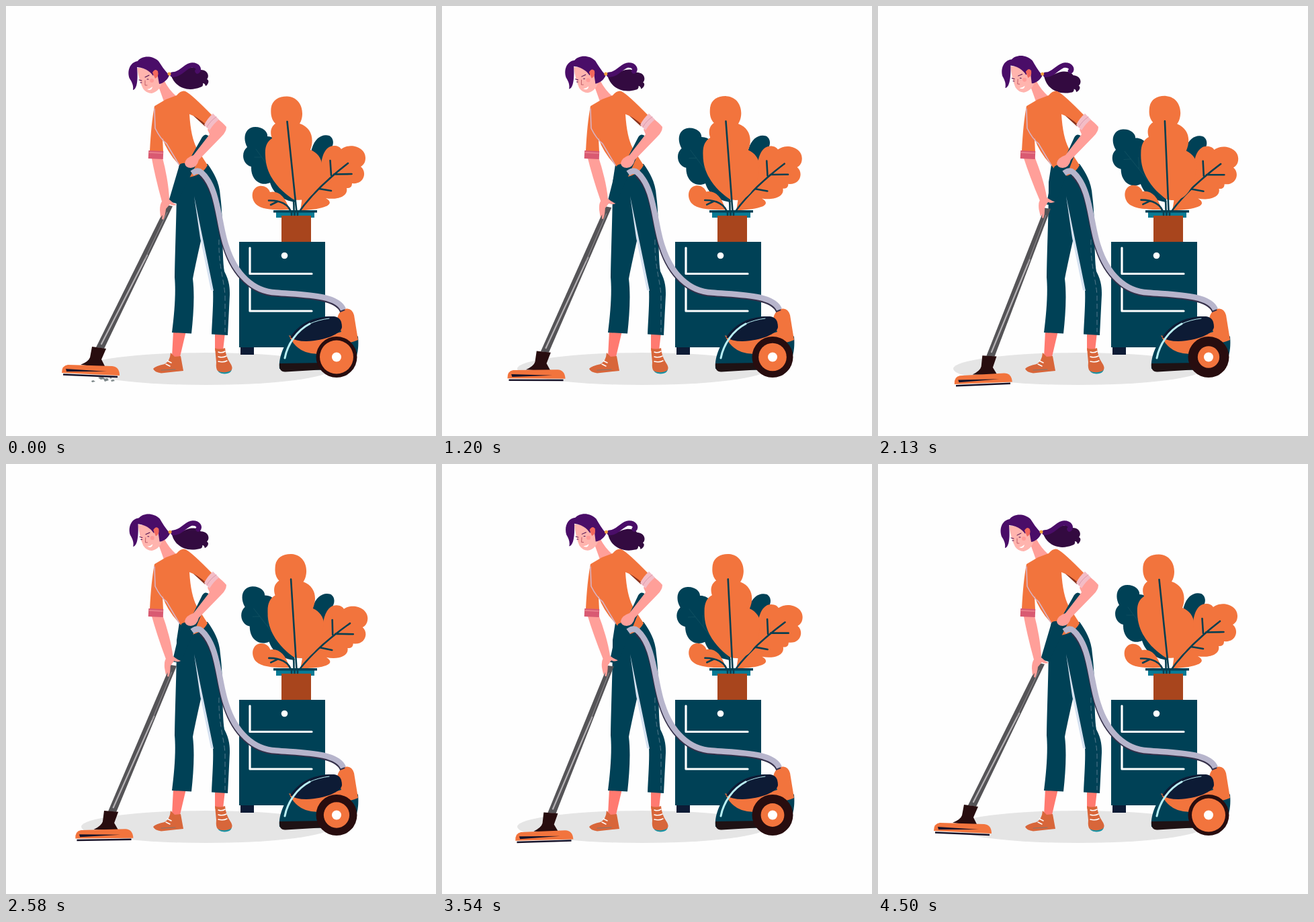
Write an HTML page that moves like this. It is 640 px wide and 640 px high and loops after 4530 ms.

```html
<!DOCTYPE html>
<html lang="en">
<head>
<meta charset="utf-8">
<title>Vacuuming</title>
<style>
  html, body { margin: 0; height: 100%; overflow: hidden; background: #fefefe; }
  svg { display: block; width: 100vw; height: 100vh; }
  .orange { fill: #f2743d; } .teal { fill: #004156; } .skin { fill: #ff9f99; }
  .navy { fill: #0d1b35; } .shoe { fill: #d8663a; } .ankle { fill: #ff7a70; }
  .line { fill: none; stroke-linecap: round; stroke-linejoin: round; }
  .flat { fill: none; }
  .vein { stroke: #073f50; stroke-width: 2.6; }
  .white { stroke: #fff; }
</style>
</head>
<body>
<svg viewBox="0 0 640 640">
  <ellipse cx="298" cy="540" rx="186" ry="24" fill="#e5e5e5"/>

  <!-- cabinet -->
  <path class="navy" d="M349 507h20v12h-20z"/>
  <path class="teal" d="M347 351h128v157h-128z"/>
  <path class="line white" stroke-width="3.2" d="M363 360v38.500h92M363 418v36h92"/>
  <circle cx="414.500" cy="371.500" r="4.800" fill="#fff"/>

  <!-- plant -->
  <g id="backLeaf">
    <path class="teal" d="M430 292C412 289 398 280 393 263C380 269 364 260 365 239C352 236 349 218 359 210C351 195 357 180 371 180C383 180 390 188 389 194C402 194 410 206 407 220L428 262Z"/>
    <path class="line" stroke="#0d4d5f" d="M372 213L428 291M392 241v-18M381 225h-11"/>
  </g>
  <g id="sideLeaf">
    <path class="teal" d="M455 213C460 195 472 190 481 193C489 197 488 208 483 213C488 220 481 235 467 239L440 290Z"/>
  </g>
  <g id="lowLeaf">
    <path class="orange" d="M424 303C405 304 381 304 372 295C363 285 366 270 377 268C386 267 391 272 393 277C405 274 416 284 421 301Z"/>
    <path class="line vein" d="M425 311C423 294 406 289 391 289.500M404 291L394 296"/>
  </g>
  <g id="rightLeaf">
    <path class="orange" d="M438 305L441 284L469 237C470 222 476 208 488 208C494 208 497 210 499 213C512 203 535 210 535 226C535 233 532 237 528 239C538 247 533 266 515 264C515 271 510 271 507 271C510 284 491 289 476 286C485 291 483 296 474 299C464 303 449 303 438 305Z"/>
    <path class="line vein" d="M433 311C447 290 469 265 509 234M484 252L482.500 230M488 250.500L514.500 250M466 272L484 275"/>
  </g>
  <g id="midLeaf">
    <path class="orange" d="M428 288C414 279 387 258 386 223C385 210 388 202 396 197C392 187 395 179 401 175C394 168 394 159 394.500 152C396 140 406 134.500 418 134.500C434 135 441 148 441 160C441 167 439 172 437 175C455 181 459 198 453 214C466 219 473 232 469 243C470 260 464 268 460 275C453 286 442 291 428 288Z"/>
    <path class="line vein" d="M418.500 172L433 311"/>
  </g>
  <path class="line vein" d="M428 290C429 300 428 304 429 311"/>
  <path d="M402 306h57v9h-57z" fill="#087b95"/>
  <path d="M410 312h44v39h-44z" fill="#a8451d"/>
  <path class="teal" d="M398 304h65v3.500h-65z"/>
  <path class="line vein" stroke-width="2" d="M425 305v6M429.500 305v6M434 305v6"/>

  <!-- vacuum cleaner -->
  <path class="teal" d="M407 540C405 520 417 499 426 488C440 468 465 461 488 462L524 492Q526 515 518 532L480 542Z"/>
  <path class="orange" d="M421 490Q445 503 499 485L493 466Q495 452 507 450.500Q515 450 518 460L524 497Q510 503 505 500L472 517Q435 522 421 490Z"/>
  <path class="navy" d="M423 493C438 469 465 461 488 462Q500 463 500 478C499 488 475 498 447 499Q431 499 423 493Z"/>
  <path class="line" stroke="#b9eff4" stroke-width="3" d="M415 524C419 503 433 483 452 473"/>
  <path class="line" stroke="#b9eff4" stroke-width="1" d="M452 473Q465 467 481 465"/>
  <path d="M407 532L475 531V541L416 544.500Q406 545 407 532Z" fill="#1e1214"/>
  <circle cx="492" cy="522.500" r="30.500" fill="#280d0f"/>
  <circle id="tyre" class="orange" cx="492" cy="522.500" r="25"/>
  <circle cx="492" cy="522.500" r="7" fill="#fff"/>

  <!-- legs -->
  <path class="ankle" d="M249 484h19L259 522H247ZM311 486h15L323 513H311Z"/>
  <path class="shoe" d="M245 516L251 522L260 521L264 543L231 546.500Q221 545 219 540Q222 536 236 533Q244 529 245 516Z"/>
  <path d="M314 538H336Q337 547 325 547.500Q314 547 314 538Z" fill="#1593a5"/>
  <path class="shoe" d="M311 509Q318 512 326 509Q327 522 334 532Q340 541 332 544Q322 547 315 543Q312 540 313 530Z"/>
  <path class="line white" stroke-width="1.500" d="M238 533L244 536M240 528L246 531M316 515Q321 517 326 514M316 522Q322 524 328 521M316 529Q323 531 329 528"/>
  <path class="line" stroke="#80766f" d="M231 542L252 541"/>
  <path class="teal" d="M258 236L300 235C311 250 318 265 319 283C324 320 321 370 325 395C333 410 333 421 333 430L330 490L306 488.500C307 465 309 440 308 422C301 395 296 370 291 345C287 363 282 385 278 406C281 430 279 460 276 487.500L247 486C251 455 253 425 251 404C252 350 254 310 254 262Z"/>
  <path d="M280 283L289 345L305 423L309 424L300 380L290 332Z" fill="#d5e1f0"/>
  <path class="line" stroke="#55798a" stroke-width="1" stroke-dasharray="7 5" d="M317 348C316 385 324 405 326 430V485"/>

  <!-- neck and head -->
  <path class="skin" d="M226 117L236 112Q242 124 254 135L235 142Q230 128 226 117Z"/>
  <g id="head">
    <g id="tail">
      <path d="M245 102C254 104 259 99 266 95C277 89 286 92 288 95C301 94 303 105 299 109C304 111 300 118 297 119Q296 115 293 115Q294 120 289 121C274 127 253 125 245 102Z" fill="#330a40"/>
    </g>
    <path id="curl" class="line" stroke="#4a0d68" stroke-width="7.500" d="M248 102C261 102 267 88 277 88C286 88 288 95 285 97"/>
    <path d="M195 92L224 93L233 109Q231 126 217 130Q209 130 204 123Q198 111 195 92Z" fill="#ffb4ae"/>
    <path d="M189 125C194 124 197 114 195 91C210 92 217 101 219 104C221 95 227 98 226 105L228 116C235 115 241 109 243 103C236 96 231 88 227 82C216 72 201 75 196 82C184 84 180 97 184 108C188 114 190 119 189 125Z" fill="#4a0d68"/>
    <path d="M218 99Q222 92 226 97Q228 105 222 108Z" fill="#f2685d"/>
    <circle cx="217" cy="111" r="3" fill="#ff9b98"/>
    <path class="line" stroke="#4a0d50" stroke-width="1" d="M198 110L202 111M207 106L213 103M200 114h2M210 109h2"/>
    <path class="line" stroke="#a63a4c" stroke-width=".7" d="M207 111V118L210 118"/>
    <path d="M210 124Q215 123 218 120Q217 127 210 124Z" fill="#fff"/>
    <circle cx="243" cy="101" r="2.500" fill="#f2a03d"/>
  </g>

  <!-- shirt -->
  <path d="M273 158L301 174L296 179Z" fill="#8a321c"/>
  <path class="orange" d="M221 149L238 139L254 133Q261 125 267 127Q276 131 308 164L298 177Q285 165 273 161Q275 195 284 212L300 237Q292 252 272 255L258 237Q240 218 233 197L234 217L214 216Q216 175 221 149Z"/>
  <path class="line" stroke="#d9b3c3" stroke-width="1.600" d="M221 153L222 182Q230 198 239 205L258 237"/>

  <!-- dust -->
  <path id="dust" fill="#7b8587" d="M127 558l3-1l3 2l-5 1zM137 553l7-2l3 4l-6 1zM145 555l6-1l2 3l-6 2zM156 557l4-1l2 2l-5 1zM153 551l5 1l-2 3z"/>

  <!-- wand -->
  <g id="wand">
    <path class="teal" d="M292 195Q297 188 303 195L282 238L254 294L242 291L258 237Q260 233 270 234Z"/>
    <path d="M239 296L248 298L146 510L134 508Z" fill="#555457"/>
    <path class="line" stroke="#b5b2b5" stroke-width="2.200" d="M210 371L142 503"/>
    <path class="line" stroke="#908c90" stroke-width="1" d="M240 307L207 376"/>
    <path d="M128 507L149 510L142 526L148 538L111 534Q123 529 125 523Z" fill="#280d0f"/>
    <path class="flat" stroke="#171329" stroke-width="2.500" d="M85 548.500L166 552"/>
    <path class="orange" d="M83 546Q83 535 92 534L158 536Q169 537 169 550Z"/>
    <path d="M89 540L150 544L90 544Z" fill="#171329"/>
  </g>

  <!-- arms -->
  <g id="forearm">
    <path class="skin" d="M216 222L232 222Q242 260 243 288Q248 293 254 296Q248 298 244 295L238 302Q237 312 234 318L232 317L233 311L230 315L229 304Q229 295 232 291Q222 255 216 222Z"/>
  </g>
  <path class="flat" stroke="#d95a72" stroke-width="12" d="M212 221L234 222"/>
  <path class="line" stroke="#ec8792" stroke-width="1.500" d="M213 218L233 219"/>

  <!-- hose -->
  <path class="flat" stroke="#35304a" stroke-width="8" transform="translate(-1 1.500)" d="M291 249C317 271 316 325 328 359C341 399 368 425 402 427C440 430 493 430 502 453"/>
  <path class="flat" stroke="#b7b5cc" stroke-width="8.500" d="M277 249Q285 243 291 248C317 271 316 325 328 358C341 399 368 425 402 426.500C440 430 493 429 502 452"/>

  <path class="skin" d="M300 184L314 167Q323 174 328 180Q328 187 321 194L287 229Q284 241 275 241Q267 241 266 234Q267 226 279 222L303 191Z"/>
  <path d="M308 160L317 169Q309 175 303 185L295 177Q299 168 308 160Z" fill="#f3bcc6"/>
  <path class="line" stroke="#dc99aa" stroke-width="1" d="M299 180Q304 171 313 165"/>
</svg>
<script>
  const LOOP = 4530, ACTIVE = 4500, SWEEP = 1500, SWAY = 1125;
  const $ = id => document.getElementById(id);
  const pingPong = (t, period) => 1 - Math.abs(1 - 2 * (t % period) / period);
  const rotate = (id, angle, x, y) => $(id).setAttribute('transform', `rotate(${angle} ${x} ${y})`);

  function draw(now) {
    const t = Math.min(now % LOOP, ACTIVE);
    const sweep = pingPong(t, SWEEP), sway = pingPong(t, SWAY);
    rotate('wand', -5.8 * sweep, 297, 193);
    rotate('forearm', -9 * sweep, 224, 224);
    rotate('head', 4 * sweep, 240, 130);
    rotate('tail', 8 * sweep, 246, 103);
    rotate('curl', -5 * sweep, 246, 103);
    rotate('midLeaf', 4.2 * sweep, 433, 308);
    rotate('backLeaf', -3.8 * sweep, 430, 302);
    rotate('sideLeaf', 1.7 * sweep, 430, 302);
    rotate('lowLeaf', 1.8 * sweep, 426, 308);
    rotate('rightLeaf', 4.1 * sway, 437, 306);
    $('tyre').setAttribute('r', 25 - 10.5 * sweep);
    const dusty = t < ACTIVE && t % SWEEP < SWEEP / 2;
    $('dust').setAttribute('visibility', dusty ? 'visible' : 'hidden');
    requestAnimationFrame(() => draw(performance.now()));
  }
  draw(0);
</script>
</body>
</html>
```
